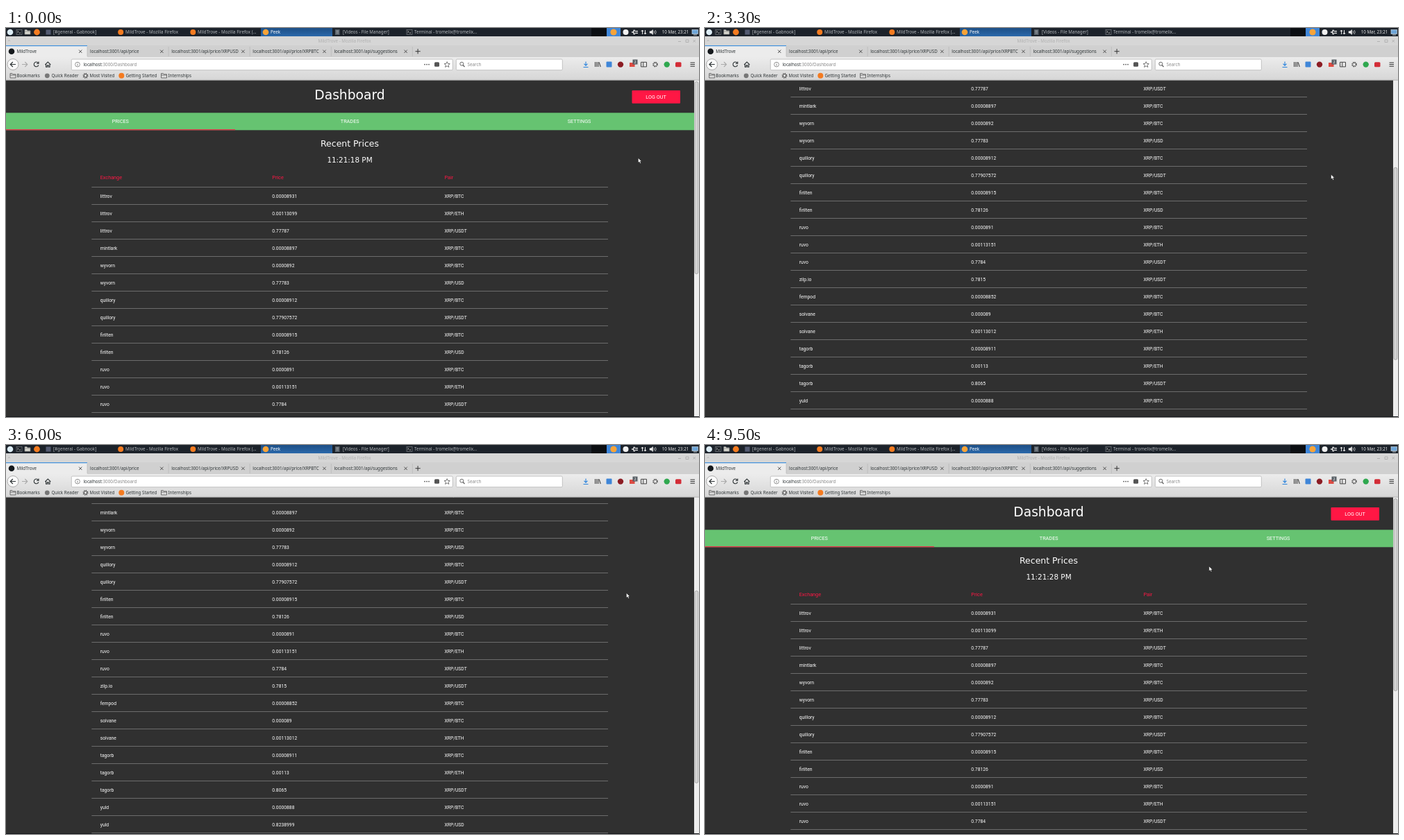
Recreate the animation shown at these times as an HTML page. Size 998x561 px, loop 10 s.

```html
<!DOCTYPE html>
<html lang="en">
<head>
<meta charset="utf-8">
<title>Dashboard</title>
<style>
html, body { margin: 0; width: 100%; height: 100%; overflow: hidden; background: #303030; }
svg { display: block; width: 998px; height: 561px; }
text { white-space: pre; }
.ui { font: 6.24px "Noto Sans", sans-serif; }
.page { font: 6.76px Roboto, sans-serif; fill: #fff; }
.head { font: 18.7px "DejaVu Sans", sans-serif; fill: #fff; }
</style>
</head>
<body>
<svg id="stage" viewBox="0 0 998 561"></svg>
<script>
const LOOP = 10000, RED = '#ff1744', INK = '#2e3436', ORANGE = '#f47b20';

const rect = (x, y, w, h, fill, extra = '') =>
  `<rect x="${x}" y="${y}" width="${w}" height="${h}" fill="${fill}" ${extra}/>`;
const dot = (x, y, r, fill, extra = '') =>
  `<circle cx="${x}" cy="${y}" r="${r}" fill="${fill}" ${extra}/>`;
const line = (d, color = INK, width = 1, fill = 'none') =>
  `<path d="${d}" stroke="${color}" stroke-width="${width}" fill="${fill}"/>`;
const text = (x, y, str, cls = 'ui', style = '', extra = '') =>
  `<text x="${x}" y="${y}" class="${cls}" style="${style}" ${extra}>${str}</text>`;
const centered = (x, y, str, cls, size, extra = '') =>
  text(x, y, str, cls, `font-size:${size}px`, `text-anchor="middle" ${extra}`);
const folder = (x, y, fill, stroke) =>
  line(`M${x} ${y}h3l1 1.3h4v5.2h-8zM${x} ${y + 2.4}h8`, stroke, 0.8, fill);
const terminal = (x, y) =>
  rect(x, y, 8, 7, '#20252b', 'stroke="#8a9096" stroke-width=".6"') +
  line(`M${x + 1.5} ${y + 1.8}l1.5 1.2l-1.5 1.2M${x + 4} ${y + 4.6}h2`, '#eee', 0.7);

const markets = [
  ['littrov', 'BTC 0.00008931', 'ETH 0.00113099', 'USDT 0.77787'],
  ['mintlark', 'BTC 0.00008897'],
  ['wyvorn', 'BTC 0.0000892', 'USD 0.77783'],
  ['quillory', 'BTC 0.00008912', 'USDT 0.77907572'],
  ['firilten', 'BTC 0.00008915', 'USD 0.78126'],
  ['ruvo', 'BTC 0.0000891', 'ETH 0.00113151', 'USDT 0.7784'],
  ['zilp.io', 'USDT 0.7815'],
  ['fernpod', 'BTC 0.00008852'],
  ['solvane', 'BTC 0.000089', 'ETH 0.00113012'],
  ['tagorb', 'BTC 0.00008911', 'ETH 0.00113', 'USDT 0.8065'],
  ['yuld', 'BTC 0.0000888', 'USD 0.8238999'],
  ['oakvire', 'BTC 0.00009039', 'ETH 0.00113774'],
  ['huv.io', 'BTC 0.00008898', 'USD 0.8107'],
];
const rows = markets.flatMap(([name, ...quotes]) => quotes.map(q => {
  const [coin, price] = q.split(' ');
  return [name, price, 'XRP/' + coin];
}));
const COLUMNS = [135.7, 383.3, 631.5];

function page() {
  const cells = (values, y, style) =>
    values.map((v, i) => text(COLUMNS[i], y, v, 'page', style)).join('');
  return centered(495, 102.5, 'Dashboard', 'head', 18.7) +
    rect(901.5, 90, 69.5, 18.7, RED, 'rx="1"') +
    centered(936, 102, 'LOG OUT', 'page', 7.28) +
    rect(0, 122.3, 991, 25, '#66c371') + rect(0, 146.2, 330, 1.1, RED) +
    ['PRICES', 'TRADES', 'SETTINGS'].map((s, i) =>
      centered(164.8 + i * 330.4, 136.8, s, 'page', 7.28)).join('') +
    centered(495, 171.3, 'Recent Prices', 'head', 12.47) +
    centered(495, 193.7, '', 'head', 10.4, 'id="clock"') +
    cells(['Exchange', 'Price', 'Pair'], 217.6, `fill:${RED};font-size:7.28px`) +
    rows.map((row, i) =>
      rect(123.3, 229 + i * 25, 743.7, 1, '#6c6c6c') + cells(row, 244.5 + i * 25)).join('');
}

function panel() {
  const grey = 'fill:#b4b8bc';
  const app = 'MildTrove - Mozilla Firefox';
  return rect(0, 0, 998, 12, '#1c222a') +
    rect(367, 0, 103, 12, 'url(#blue)') +
    rect(843, 0, 22, 12, '#0b0e12') + rect(865, 0, 20, 12, '#3f86d8') +
    dot(6, 6, 4.3, '#dcecf5') + terminal(15, 2.5) + folder(27, 2.6, '#d8d8d0', '#888') +
    dot(44.5, 6, 4.4, ORANGE) +
    rect(57.5, 2.5, 7, 7, '#545b72') + text(68, 8.2, '[#general - Gabnook]', 'ui', grey) +
    dot(165.2, 6, 4, ORANGE) + text(172, 8.2, app, 'ui', grey) +
    dot(269.3, 6, 4, ORANGE) + text(276, 8.2, app + ' (...', 'ui', grey) +
    dot(374, 6, 4.3, '#f7a338') + text(381, 8.2, 'Peek', 'ui', 'fill:#fff') +
    rect(474, 2, 6.5, 8, '#59636c') + line('M475.5 4.5h3.5M475.5 7h3.5', '#bbb', 0.8) +
    text(485, 8.2, '[Videos - File Manager]', 'ui', grey) +
    terminal(577, 2.5) + text(588, 8.2, 'Terminal - tromelix@tromelix...', 'ui', grey) +
    dot(875, 6, 4.6, '#f7a338') + dot(892.5, 6, 4, '#f0f0f0') +
    line('M901 6h3M906 3.5h-2v5h2M906 4.7h4M906 7.3h4', '#eee', 1.3) +
    line('M916.5 9V3l-1.8 2M916.5 3l1.5 2M920.5 3v6l-1.8-2M920.5 9l1.5-2', '#eee') +
    line('M927 4.7h2l2.5-2.2v7l-2.5-2.2h-2z', '#eee', 0.5, '#eee') +
    line('M933 4q1.5 2 0 4M935 3q2.4 3 0 6', '#ddd', 0.8) +
    text(944.7, 8.2, '10 Mar, 23:21', 'ui', 'fill:#e6e6e6') +
    rect(988, 2.5, 8.5, 6, '#6ea6d8', 'stroke="#ccd8e2" stroke-width=".7"') +
    line('M990 10h5', '#ccd8e2', 0.9);
}

function browser() {
  const tabs = ['MildTrove', ...['price', 'price/XRPUSD', 'price/XRPBTC', 'suggestions']
    .map(s => 'localhost:3001/api/' + s)];
  const bookmarks = [[15.5, 'Bookmarks'], [65.5, 'Quick Reader'], [120.5, 'Most Visited'],
    [172.5, 'Getting Started'], [233.5, 'Internships']];
  const extras = '<tspan fill="#888">:3000/Dashboard</tspan>';
  return rect(0, 12, 998, 13.5, '#d6d6d6') + rect(0, 25, 998, 17.5, '#d0d0d0') +
    rect(0, 42, 998, 33.3, 'url(#bar)') + rect(0, 74.7, 998, 0.8, '#aaa') +
    centered(487.5, 21.4, 'MildTrove - Mozilla Firefox', 'ui', 6.24,
      'font-weight="700" fill="#b0b0b0"') +
    line('M3 19l1.5-1.5l1.5 1.5M968 19.5h4M979 17h4v3.5h-4zM989.5 17l3.5 3.5M993 17l-3.5 3.5', '#aaa', 0.8) +
    rect(0, 25, 117, 17.5, '#ececec') + rect(0, 25, 117, 1.2, '#3f8fdc') +
    dot(8, 33.8, 4.3, '#15191c') +
    tabs.map((s, i) => {
      const x = i * 117.1;
      return text(i ? x + 4 : 15.5, 36.1, s, 'ui', `fill:${INK}`, i ? 'clip-path="url(#tabs)"' : '') +
        line(`M${x + 105} 31.6l4.4 4.4m0-4.4l-4.4 4.4`, '#444', 0.9) +
        line(`M${x + 117} 27v14`, '#b4b4b4', 0.6);
    }).join('') +
    line('M589.5 33.7h7.2M593.1 30.1v7.2', '#333') +
    dot(10, 52.5, 8, '#fafafa', 'stroke="#999" stroke-width=".8"') +
    line('M14 52.5h-7.5M9.8 49l-3.5 3.5l3.5 3.5', INK, 1.2) +
    line('M23 52.5h7.5M27.3 49l3.5 3.5l-3.5 3.5', '#aaa', 1.1) +
    line('M46.5 50.5a3.4 3.4 0 1 0 .4 3M47 48.4v2.7h-2.8', INK, 1.1) +
    line('M56.3 52.8l4-3.8l4 3.8M57.6 52.3v4h1.8v-2.4h1.8v2.4h1.8v-4', INK, 1.1) +
    rect(94.3, 45, 549, 15.7, '#fff', 'rx="1.5" stroke="#b5b5b5" stroke-width=".8"') +
    rect(648.3, 45, 153, 15.7, '#fff', 'rx="1.5" stroke="#b5b5b5" stroke-width=".8"') +
    dot(103, 52.6, 3.4, 'none', 'stroke="#666" stroke-width=".7"') +
    line('M103 52v2.5M103 50.4v.8', '#666', 0.8) +
    text(111.5, 55, 'localhost' + extras, 'ui', `fill:${INK}`) +
    [603, 606, 609].map(x => dot(x, 52.6, 0.9, '#555')).join('') +
    rect(617, 49.3, 7, 6.5, '#555', 'rx="1.5"') +
    line('M635.2 48.6l1.2 2.7l2.9.3l-2.2 1.9l.7 2.9l-2.6-1.5l-2.6 1.5l.7-2.9l-2.2-1.9l2.9-.3z', '#555', 0.8) +
    dot(656.3, 51.7, 2.5, 'none', 'stroke="#555" stroke-width=".9"') + line('M658 53.5l2.5 2.5', '#555', 1.1) +
    text(664.5, 55, 'Search', 'ui', 'fill:#888') +
    line('M835 48.5v5.5M832.5 51.7l2.5 2.5l2.5-2.5M831.5 56.5h7', '#2a83dd', 1.1) +
    line('M848.5 49v7M850.7 49v7M852.9 49v7M854.2 49.3l2 6.7', '#444', 1.1) +
    rect(864.5, 48.5, 8, 8, '#3f86d8', 'rx="1"') + dot(885, 52.6, 4.2, '#8c1c23') +
    rect(898, 50, 7.5, 6, '#dd4b43') + rect(902.5, 45.5, 7, 7, '#596066') +
    text(904.5, 51, '2', 'ui', 'fill:#fff;font-size:5.3px') +
    line('M914.5 49.3h8v6.6h-8zM917.7 49.3v6.6', '#444', 1) +
    dot(935, 52.6, 2.8, 'none', 'stroke="#555" stroke-width="2" stroke-dasharray="1.5 .7"') +
    dot(951.7, 52.6, 4.2, '#2fa84f') + rect(964, 49.2, 8.5, 7, '#d32d37', 'rx="1.5"') +
    line('M985.5 50h6.5M985.5 52.6h6.5M985.5 55.2h6.5', '#333', 1) +
    folder(6, 65.5, 'none', '#555') + dot(59.3, 68.8, 3.4, '#777') +
    dot(114.5, 68.8, 2.3, 'none', 'stroke="#444" stroke-width="1"') +
    dot(114.5, 68.8, 3.4, 'none', 'stroke="#444" stroke-width="1.2" stroke-dasharray="1.2 1.47"') +
    dot(166.3, 68.8, 4, ORANGE) + folder(223.5, 65.5, 'none', '#555') +
    bookmarks.map(([x, s]) => text(x, 71.1, s, 'ui', `fill:${INK}`)).join('');
}

const gradient = (id, from, to) => `<linearGradient id="${id}" x2="0" y2="1">
  <stop stop-color="${from}"/><stop offset="1" stop-color="${to}"/></linearGradient>`;
const clips = [0, 1, 2, 3, 4].map(i => rect(i * 117.1, 25, 101, 17, '#000')).join('');

const $ = id => document.getElementById(id);
$('stage').innerHTML = `<defs>${gradient('blue', '#1d4f86', '#2a68aa')}
  ${gradient('bar', '#ececec', '#d6d6d6')}<clipPath id="tabs">${clips}</clipPath></defs>` +
  rect(0, 75, 998, 486, '#303030') + `<g id="page">${page()}</g>` +
  rect(991, 75, 7, 486, '#ededed') +
  rect(992, 77.5, 4.8, 277, '#d2d2d2', 'id="thumb" rx="2.2" stroke="#9c9c9c" stroke-width=".8"') +
  rect(0, 560, 998, 1, '#15181c') + browser() + panel() +
  `<g id="cursor">${line('M.3.3v7.2l1.7-1.5l1.2 2.6l1.4-.6l-1.2-2.5h2.3z', '#111', 0.6, '#fff')}</g>`;

// Keyframes: time followed by one or more values, linear in between.
const SCROLL = [[1400, 0], [1600, 7], [1900, 37], [2600, 155], [2800, 168], [3000, 168],
  [3300, 205], [3800, 318], [4100, 331], [4800, 290], [5300, 290], [5800, 214 + 10], [6000, 220],
  [6100, 220], [6500, 118], [6600, 110], [6800, 110], [7200, 18], [7300, 12.5], [7400, 12.5], [7900, 0]];
const POINTER = [[2300, 910, 187], [2600, 908.4, 196], [3100, 903, 206], [4100, 893.6, 230],
  [4800, 893, 213], [8400, 893, 213], [9200, 725.5, 174.5]];

function at(keys, t) {
  const next = keys.findIndex(k => k[0] > t);
  if (next < 0) return keys[keys.length - 1].slice(1);
  if (!next) return keys[0].slice(1);
  const a = keys[next - 1], b = keys[next], f = (t - a[0]) / (b[0] - a[0]);
  return a.slice(1).map((v, i) => v + (b[i + 1] - v) * f);
}

function draw(now) {
  const t = Math.floor(now % LOOP / 100) * 100;  // the screen updates ten times a second
  const [scroll] = at(SCROLL, t);
  $('page').setAttribute('transform', `translate(0 ${-scroll})`);
  $('thumb').setAttribute('y', 77.5 + scroll * 0.604);
  $('cursor').setAttribute('transform', `translate(${at(POINTER, t)})`);
  $('clock').textContent = `11:21:${18 + Math.floor((t + 500) / 1000)} PM`;
}

const start = performance.now();
function tick() {
  draw(performance.now() - start);
  requestAnimationFrame(tick);
}
tick();
</script>
</body>
</html>
```
